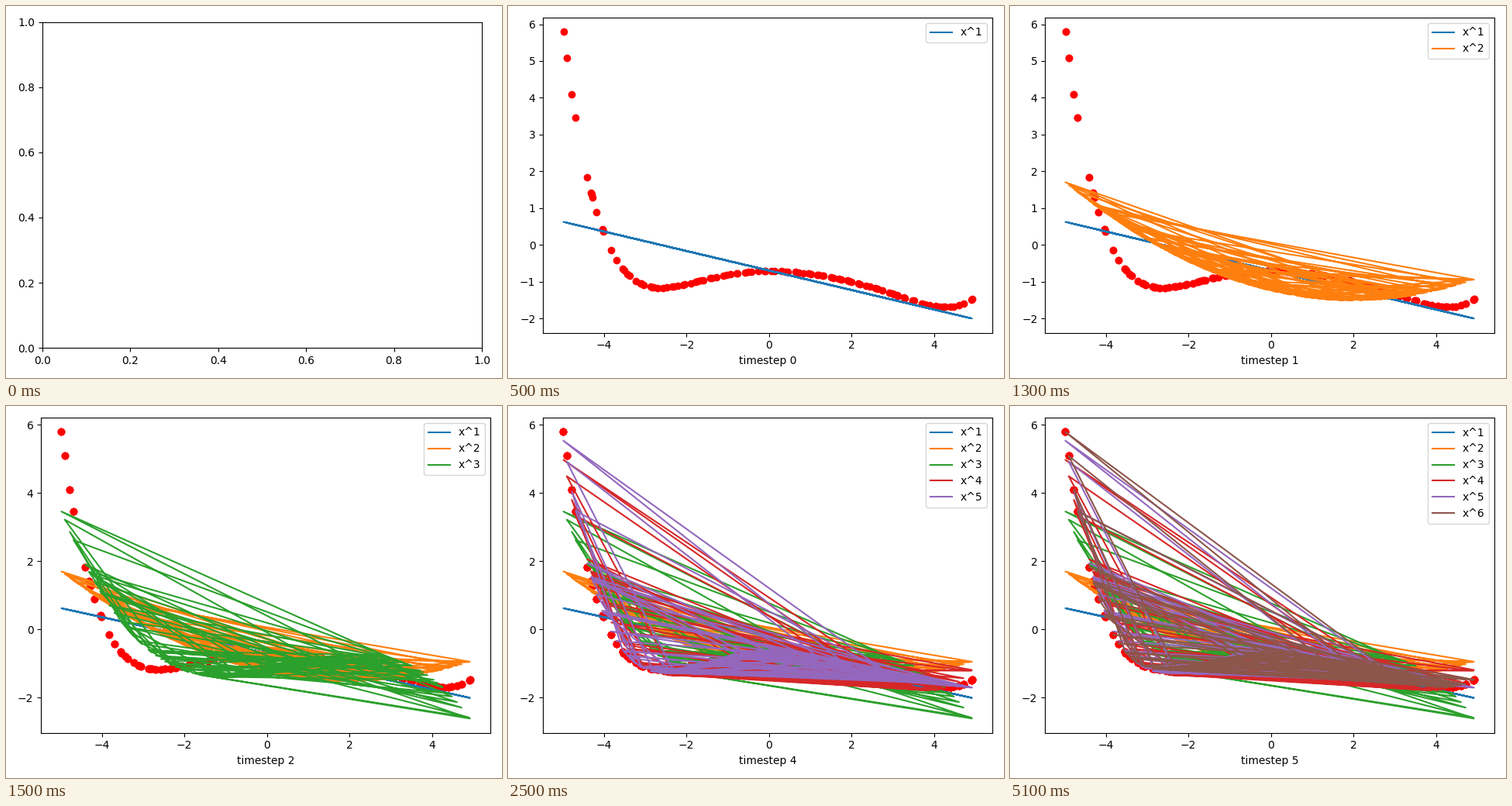
Recreate the animation shown at these times as a matplotlib script. Size 640 by 480 pixels, loop 6500 ms.

```python
import numpy as np
import matplotlib.pyplot as plt
from matplotlib.animation import FuncAnimation
from numpy.polynomial import Polynomial

plt.rcParams["font.family"] = "DejaVu Sans"

STEP_MS = 500
FRAMES = 13
MAX_DEGREE = 6
BODY_COUNT = 80

# Key points of the smooth curve the samples lie on.
CURVE_X = [-4.98, -4.69, -4.40, -4.03, -3.54, -2.64, -0.60, 1.00, 2.80, 4.10, 4.92]
CURVE_Y = [5.80, 3.47, 1.86, 0.39, -0.66, -1.17, -0.75, -0.79, -1.26, -1.68, -1.47]

# The line starts by jumping to and from the outermost samples.
OUTER_PATH = [3.0, -4.98, 1.9, -2.3, -4.9, 1.2, -2.8, -4.775, -3.54,
              3.1, -4.685, -3.1, -1.6, 4.92, -4.04]
LEFT_CLUSTER = [-4.40, -4.31, -4.30, -4.28, -4.18, -4.02]


def make_samples():
    """Unsorted x positions: outer path, then a shuffled, jittered spread."""
    rng = np.random.default_rng(3)
    body = np.linspace(-3.77, 4.86, BODY_COUNT)
    body += rng.uniform(-0.06, 0.06, BODY_COUNT)
    rng.shuffle(body)
    slots = np.linspace(4, BODY_COUNT - 4, len(LEFT_CLUSTER)).astype(int)
    return np.concatenate([OUTER_PATH, np.insert(body, slots, LEFT_CLUSTER)])


x = make_samples()
y = Polynomial.fit(CURVE_X, CURVE_Y, 7)(x)
fits = [Polynomial.fit(x, y, degree)(x) for degree in range(1, MAX_DEGREE + 1)]

fig, ax = plt.subplots(figsize=(6.4, 4.8), dpi=100, layout="tight")


def update(frame):
    ax.clear()
    steps = min(frame, MAX_DEGREE)
    for i in range(steps):
        ax.scatter(x, y, color="red")
        ax.plot(x, fits[i], color=f"C{i}", label=f"x^{i + 1}")
    if steps:
        ax.set_xlabel(f"timestep {steps - 1}")
        ax.legend(loc="upper right")


animation = FuncAnimation(fig, update, frames=FRAMES, interval=STEP_MS,
                          repeat=True, repeat_delay=0)
plt.show()
```
